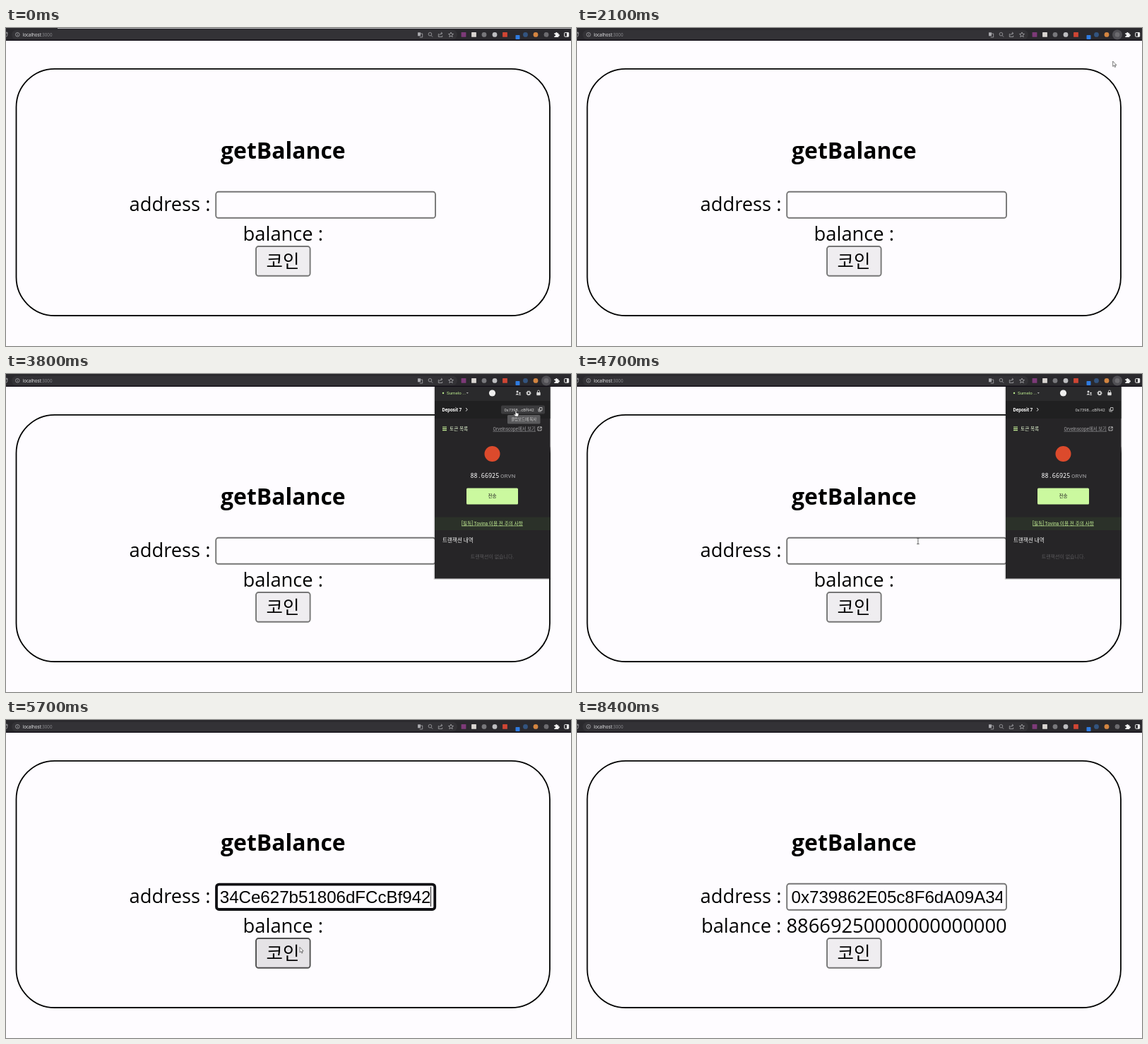
Write an HTML page that moves like this. It is 800 px wide and 450 px high and loops after 8500 ms.

```html
<!DOCTYPE html>
<html lang="ko">
<head>
<meta charset="utf-8">
<title>getBalance</title>
<style>
html, body { margin: 0; width: 100%; height: 100%; overflow: hidden; background: #fefcff; }
svg { display: block; width: 100vw; height: 100vh; }
text { font-family: "Open Sans", "Noto Sans CJK KR", "Noto Sans CJK", sans-serif; white-space: pre; }
.big { font-size: 27.3px; }
.field { font: 24.1px "Liberation Sans", Arial, sans-serif; }
.ko { font-family: "Noto Sans CJK KR", "Noto Sans CJK", sans-serif; }
.mid { text-anchor: middle; }
.end { text-anchor: end; }
.line { fill: none; stroke: #a9a9ad; stroke-width: .8; }
#popup text { font-family: Roboto, "Noto Sans CJK KR", "Noto Sans CJK", sans-serif; }
#popup .mono { font: 8.5px "Noto Sans Mono", monospace; }
</style>
</head>
<body>
<svg viewBox="0 0 800 450" preserveAspectRatio="none">
  <defs>
    <clipPath id="inner"><rect x="301" y="234" width="301" height="34"/></clipPath>
    <clipPath id="page"><rect y="17.5" width="800" height="433"/></clipPath>
  </defs>
  <rect width="800" height="450" fill="#fefcff"/>

  <g id="card">
    <rect x="14.5" y="57.8" width="755.5" height="349.2" rx="54.4" fill="none" stroke="#000" stroke-width="1.8"/>
    <text class="mid" x="392.4" y="184.5" font-size="31.9" font-weight="700">getBalance</text>
    <text class="big" x="174.5" y="258.5">address :</text>
    <rect id="box" fill="#fefcff"/>
    <g clip-path="url(#inner)">
      <text id="head" class="field" x="303.6" y="259">0x739862E05c8F6dA09A34Ce627b51806dFCcBf942</text>
      <text id="tail" class="field end" x="601.5" y="259">34Ce627b51806dFCcBf942</text>
    </g>
    <rect id="caret" y="236" width="1" height="28" fill="#222"/>
    <text id="balance" class="big mid" x="392.3" y="301"></text>
    <rect id="button" x="354" y="309" width="76.6" height="41.8" rx="3.6" stroke-width="1.9"/>
    <text class="ko mid" x="392" y="339" font-size="25.5" font-weight="300">코인</text>
  </g>

  <g clip-path="url(#page)">
    <g id="popup">
      <rect x="605.5" y="16" width="166" height="275" rx="1" fill="#000" opacity=".16"/>
      <rect x="607" y="16" width="163.5" height="273.5" fill="#262527"/>
      <rect x="607" y="16" width="163.5" height="22" fill="#2a2a2c"/>
      <rect x="607" y="38" width="163.5" height="25" fill="#202021"/>
      <circle cx="619" cy="27" r="1.2" fill="#b9e88c"/>
      <text x="624" y="29.2" font-size="6.2" fill="#b9e88c">Sumelo ...</text>
      <path d="M651.8 26h3l-1.5 2z" fill="#aaa"/>
      <circle cx="688.5" cy="27" r="4.6" fill="#eee"/>
      <g fill="#dcdcdc">
        <circle cx="724" cy="25" r="1.5"/><path d="M721.5 29.5q2.5-4 4.5 0z"/>
        <circle cx="727.5" cy="27" r="1.2"/><path d="M726 30q1.5-2.6 3.3 0z"/>
        <rect x="751.3" y="26" width="5.4" height="4.2" rx=".6"/>
      </g>
      <circle cx="740" cy="27" r="2.1" fill="none" stroke="#dcdcdc" stroke-width="1.5"/>
      <circle cx="740" cy="27" r="3.1" fill="none" stroke="#dcdcdc" stroke-width="1" stroke-dasharray="1.2 1.23"/>
      <path d="M752.5 26v-1.4a1.5 1.5 0 0 1 3 0V26" fill="none" stroke="#dcdcdc" stroke-width=".8"/>

      <rect id="nameHover" x="614" y="45" width="43.5" height="11" rx="1" fill="#515153"/>
      <text x="617.5" y="52.8" font-size="6.5" font-weight="700" fill="#fff">Deposit 7</text>
      <path d="M651.2 48l2 2.3-2 2.3" fill="none" stroke="#fff" stroke-width=".9"/>
      <rect id="addrHover" x="701" y="44.5" width="62" height="12" rx="2" fill="#3c3c3e"/>
      <text x="705.5" y="52.6" font-size="5.8" fill="#d6d6d6">0x7398...cBf942</text>
      <path d="M754 49v4h4M755.5 47.5h3.5v4h-3.5z" fill="none" stroke="#d6d6d6" stroke-width=".8"/>

      <path d="M618 75h6M618 77.3h6M618 79.6h6" stroke="#c4f096" stroke-width="1.2"/>
      <text class="ko" x="628" y="79.8" font-size="6.7" fill="#e2f4d0">토큰 목록</text>
      <text id="link" class="end" x="750" y="79.8" font-size="6.4" text-decoration="underline">Orvelnscope에서 보기</text>
      <path d="M755.5 75h-2.5v5h5v-2.5M756 74.8h2.3v2.3M758 75l-2.6 2.6" fill="none" stroke="#d0d0d0" stroke-width=".8"/>

      <circle cx="688.5" cy="113" r="11" fill="#dc4a2c"/>
      <text class="mono" x="657.5" y="147" fill="#fff">88.66925</text>
      <text x="700" y="146.7" font-size="8" font-weight="500" fill="#8b8b8d">ORVN</text>
      <rect x="652" y="161.5" width="73" height="23" rx="1.5" fill="#cbf99f"/>
      <text class="ko mid" x="688.5" y="175.2" font-size="6.6" fill="#222">전송</text>
      <rect x="607" y="202.5" width="163.5" height="18.5" fill="#2b3129"/>
      <text class="mid" x="688.5" y="213.6" font-size="6.7" fill="#c4f096" text-decoration="underline">[필독] Tovina 이용 전 주의 사항</text>
      <text x="618" y="237.6" font-size="7.6" fill="#f0f0f0">트랜잭션 내역</text>
      <text class="mid" x="688.5" y="260.6" font-size="7" fill="#59585b">트랜잭션이 없습니다.</text>
      <g id="tip">
        <rect x="710" y="58" width="46.5" height="12.5" rx="1.5" fill="#5a5a5c"/>
        <text class="mid" x="733.2" y="66.2" font-size="5.4" fill="#cfcfcf">클립보드에 복사</text>
      </g>
    </g>
  </g>

  <g id="bar">
    <rect width="800" height="18" fill="#2a292d"/>
    <rect y="16.8" width="800" height="1.2" fill="#100c16"/>
    <rect id="edge" x="73" width="727" height="1" fill="#b8b8ba"/>
    <rect x="8" y="2.7" width="631" height="13.4" rx="6.7" fill="#333236"/>
    <path class="line" d="M-1 6.5a3 3 0 1 1 0 6M0 6.2h2V8.4"/>
    <circle class="line" cx="16.3" cy="9.3" r="2.8"/>
    <path class="line" d="M16.3 8.8v2M16.3 7.4v.8"/>
    <text x="23.7" y="11.5" font-size="6.2" fill="#f0f0f2">localhost<tspan fill="#8c8c90">:3000</tspan></text>
    <rect x="583" y="6.3" width="4" height="5" fill="#a9a9ad"/>
    <path class="line" d="M587 8h2.7v5h-4"/>
    <circle class="line" cx="600.4" cy="8.7" r="2.3"/>
    <path class="line" d="M602 10.5l2 2.1"/>
    <path class="line" d="M613.3 8.5h-1v4h5.4v-1.8M613.8 10.5q.4-3 4-3M616 5.9l1.9 1.6-1.9 1.6"/>
    <path class="line" d="M630 6l1 2.3 2.5.2-1.9 1.6.6 2.5-2.2-1.4-2.2 1.4.6-2.5-1.9-1.6 2.5-.2z"/>
    <circle id="glow" cx="765" cy="9.5" r="7" fill="#504f54"/>
    <g id="icons"></g>
    <path d="M776.3 7.2h1.9a1.2 1.2 0 1 1 2.4 0h1.7v2a1.2 1.2 0 1 1 0 2.3v1.6h-6v-1.8a1.2 1.2 0 1 0 0-2.2z" fill="#f2f2f2"/>
    <rect x="790.7" y="6.6" width="6" height="5.6" rx=".6" fill="none" stroke="#f2f2f2"/>
    <rect x="794" y="6.6" width="2.8" height="5.6" fill="#f2f2f2"/>
  </g>

  <g id="cursor" stroke-linejoin="round">
    <path id="arrow" d="M0 0v7.4l1.7-1.5 1.1 2.6 1.2-.5-1.1-2.5h2.3z" fill="#fff" stroke="#444" stroke-width=".7"/>
    <path id="hand" d="M-.9.8q.9-1.2 1.7 0v2.7l2.5.6q.8.3.6 1.2L3.4 8.6h-4L-3 5.9q-.2-1 .8-.7l1.3.8z" fill="#fff" stroke="#222" stroke-width=".6"/>
    <path id="beam" d="M-1.7-4h3.4M-1.7 4h3.4M0-4v8" fill="none" stroke="#555" stroke-width=".9"/>
  </g>
</svg>
<script>
const LOOP = 8500, STEP = 100;
const $ = id => document.getElementById(id);
const set = (id, attrs) => { for (const k in attrs) $(id).setAttribute(k, attrs[k]); };
const show = (id, on) => set(id, { opacity: +on });
const ramp = (t, a, b) => Math.min(1, Math.max(0, (t - a) / (b - a)));
const within = (t, a, b) => t >= a && t < b;
const mix = (a, b, k) => `rgb(${a.map((v, i) => Math.round(v + (b[i] - v) * k))})`;

// extension badges: x, colour, round
const badges = [
  [648, '#7d3a78', 0], [662.5, '#d9d5d2', 0], [677, '#77777b', 1], [692, '#bdbdc0', 1],
  [706.5, '#cf4534', 0], [735.5, '#33547f', 1], [750, '#d48540', 1], [765, '#6c6b6f', 1]
];
$('icons').innerHTML = badges.map(([x, c, round]) =>
  `<rect x="${x - 3.4}" y="6" width="6.8" height="6.8" rx="${round ? 3.4 : .6}" fill="${c}"/>`
).join('') + '<rect x="721.5" y="10" width="6" height="6" rx=".8" fill="#2f7be0"/>';

// pointer track: time, x, y
const track = [
  [200, 640, 279], [600, 735, 110], [1000, 767, 28], [1400, 764, 11], [1900, 764, 10],
  [2100, 758.7, 47], [2300, 757, 54.5], [2900, 752, 53], [3600, 722, 51.5], [3800, 722, 51.5],
  [4200, 640, 112], [4600, 497, 228], [4800, 468.8, 245], [5400, 468.8, 245],
  [5500, 452, 286], [5700, 416, 321.5], [6800, 416, 321.5], [7200, 95.5, 344],
  [7600, 19, 387]
];

function pointer(t) {
  const i = Math.max(1, track.findIndex(p => p[0] >= t));
  const [t0, x0, y0] = track[i - 1], [t1, x1, y1] = track[i];
  const k = ramp(t, t0, t1), e = k * k * (3 - 2 * k);
  return [x0 + (x1 - x0) * e, y0 + (y1 - y0) * e];
}

function drawCursor(t) {
  const visible = within(t, 200, 7300) || within(t, 7600, 7700);
  show('cursor', visible);
  if (!visible) return;
  const [x, y] = pointer(t);
  set('cursor', { transform: `translate(${x.toFixed(2)} ${y.toFixed(2)})` });
  const hand = within(t, 2300, 3900), beam = within(t, 4700, 5500);
  show('hand', hand);
  show('beam', beam);
  show('arrow', !hand && !beam);
}

function drawPopup(t) {
  const out = ramp(t, 4900, 5100), settle = ramp(t, 2300, 2600);
  set('popup', {
    opacity: ramp(t, 2100, 2250) * (1 - out * 0.96) * (t < 5100),
    transform: `translate(0 ${-4 * out})`
  });
  show('nameHover', 1 - settle);
  set('addrHover', {
    opacity: 1 - ramp(t, 3800, 4000),
    fill: mix([86, 86, 88], [60, 60, 62], settle)
  });
  set('tip', {
    opacity: (0.4 + 0.6 * settle) * (1 - ramp(t, 3800, 4000)),
    transform: `translate(${1 - settle} ${settle - 1})`
  });
  set('link', { fill: mix([125, 125, 215], [158, 158, 160], settle) });
}

function drawForm(t) {
  const focus = within(t, 4800, 6000), pasted = t >= 5400;
  const inset = focus ? 1.8 : 1;
  set('box', {
    x: 296.2 + inset, y: 230.8 + inset, width: 312.8 - 2 * inset, height: 39 - 2 * inset,
    rx: 3.6, stroke: focus ? '#101014' : '#767676', 'stroke-width': focus ? 3.8 : 1.9
  });
  set('caret', { x: pasted ? 601 : 303.5, opacity: +focus });
  show('tail', pasted && focus);
  show('head', pasted && !focus);
  $('balance').textContent = 'balance :' + (t >= 6600 ? ' 88669250000000000000' : '');

  const hover = within(t, 5600, 6900), down = within(t, 6000, 6300);
  set('button', {
    fill: down ? '#f5f4f6' : hover ? '#e5e3e6' : '#efedf0',
    stroke: down ? '#8d8d8d' : hover ? '#4f4f4f' : '#767676'
  });
}

function draw(ms) {
  const t = Math.floor((ms % LOOP) / STEP + 1e-6) * STEP;
  show('edge', t < 1500);
  show('glow', within(t, 1200, 5100));
  drawPopup(t);
  drawForm(t);
  drawCursor(t);
}

let start;
function tick(now) {
  start ??= now;
  draw(now - start);
  requestAnimationFrame(tick);
}
draw(0);
requestAnimationFrame(tick);
</script>
</body>
</html>
```
